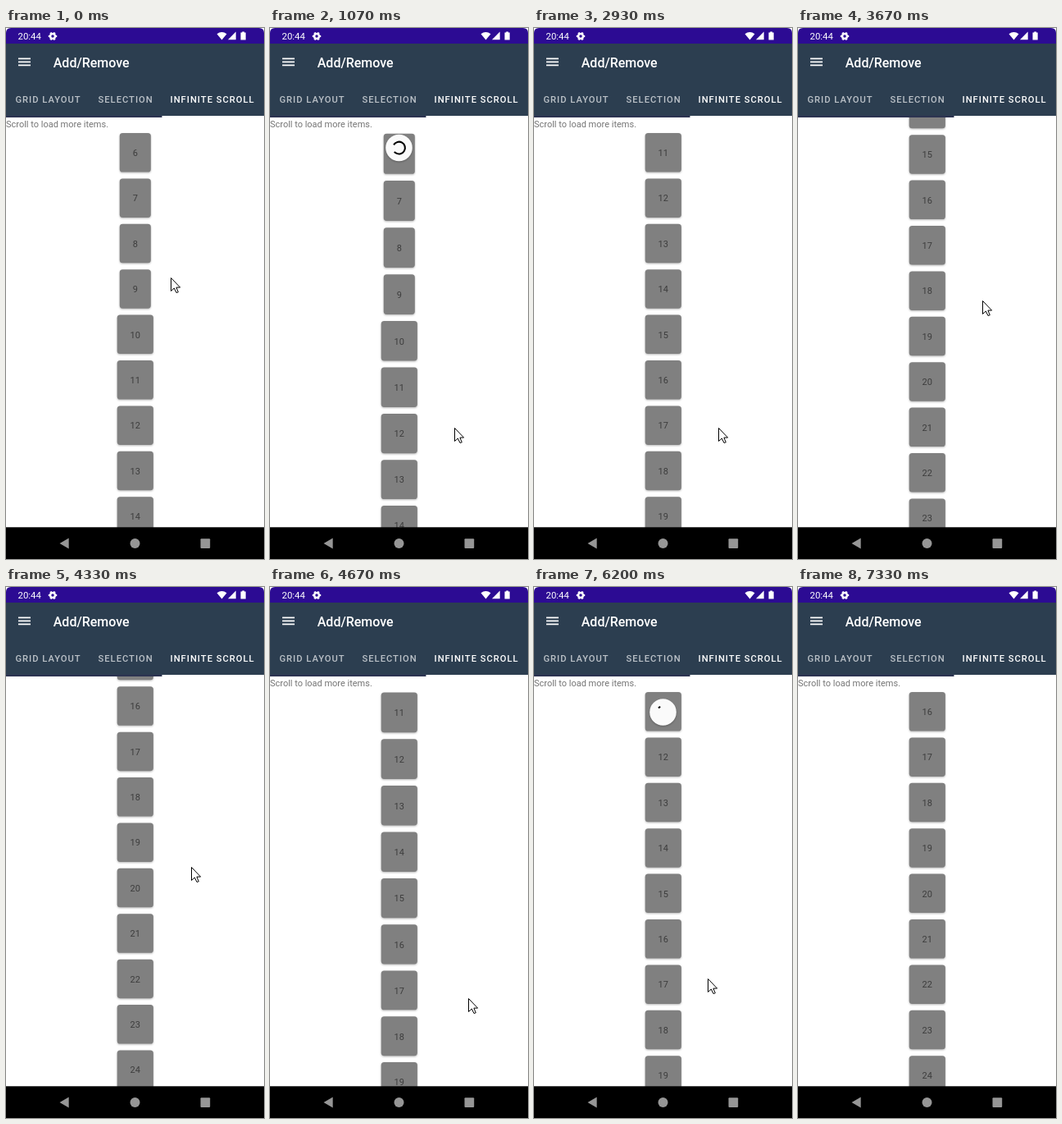
An HTML page for the animation above (8.14 s loop, 315 by 647 pixels).

```html
<!DOCTYPE html>
<html lang="en">
<head>
<meta charset="utf-8">
<title>Infinite scroll</title>
<style>
  html, body { margin: 0; width: 100%; height: 100%; overflow: hidden; background: #fff; }
  svg { display: block; width: 315px; height: 647px; }
  text { font-family: Roboto, "Noto Sans", sans-serif; font-size: 11px; }
  .bar text { fill: #fff; font-weight: 500; }
  .tabs text { font-size: 11.2px; letter-spacing: 1px; }
  .tabs .off { fill: #bcc2c8; }
  .raised { filter: drop-shadow(0 1px .8px rgba(0, 0, 0, .28)); }
  .num { fill: #3c3c3c; text-anchor: middle; }
</style>
</head>
<body>
<svg viewBox="0 0 315 647">
  <defs>
    <clipPath id="view"><rect y="109" width="315" height="500"/></clipPath>
  </defs>

  <g clip-path="url(#view)">
    <text id="caption" y="12" fill="#757575">Scroll to load more items.</text>
    <g id="list"></g>
    <g id="spinner">
      <circle class="raised" r="16.3" fill="#fafafa"/>
      <circle id="arc" r="7.4" fill="none" stroke="#000" stroke-width="2.1" pathLength="360"/>
    </g>
  </g>

  <g class="bar">
    <path d="M0 20V6Q0 0 6 0H309Q315 0 315 6V20Z" fill="#2c0b93"/>
    <rect y="19" width="315" height="90" fill="#2c3e50"/>
    <rect y="106.7" width="190.5" height="2.3" fill="#2c3451"/>
    <rect x="190.5" y="107" width="124.5" height="2" fill="#fff"/>
    <text x="14.5" y="14" style="font-size:11.4px;font-weight:400">20:44</text>
    <g transform="translate(57 10)" fill="none" stroke="#fff">
      <circle r="3" stroke-width="2.5"/>
      <circle r="4.6" stroke-width="1.3" pathLength="12" stroke-dasharray="1 1" stroke-dashoffset=".5"/>
    </g>
    <g fill="#fff">
      <path d="M257.5 7.3Q263.5 2.7 269.5 7.3L263.5 14.5Z"/>
      <path d="M280.7 4.6V14.3H271Z"/>
      <path d="M286.5 5.6H288.2V4.5H291V5.6H292.7V14.5H286.5Z"/>
    </g>
    <path d="M15 37.4H30M15 41.4H30M15 45.4H30" stroke="#fff" stroke-width="1.6"/>
    <text x="57.7" y="48.2" style="font-size:16px">Add/Remove</text>
    <g class="tabs">
      <text class="off" x="11.5" y="91">GRID LAYOUT</text>
      <text class="off" x="112.5" y="91">SELECTION</text>
      <text x="200.5" y="91">INFINITE SCROLL</text>
    </g>
  </g>

  <rect y="608.3" width="315" height="38.7" fill="#000"/>
  <g fill="#969696">
    <path d="M65.5 628L76.7 621.5V634.5Z"/>
    <circle cx="157.5" cy="628" r="6"/>
    <rect x="237.5" y="622.3" width="11.7" height="11.7" rx="1"/>
  </g>

  <path id="cursor" d="M.5 .5V16.5L4.3 13L7 18.5L9.3 17.8L6.9 12.1H11.6Z" fill="#fff" stroke="#000" stroke-linejoin="round"/>
</svg>

<script>
const LOOP = 8140, TOP = 109, VIEW = 500;
const FIRST = 128, PITCH = 55.4, CARD = 47.5, SLOTS = 18, MID = 157.8;
const REST = 152.5, TRAVEL = 61, SETTLE = 200, SHRINK = 150;
const FIRST_ITEM = 6, BATCH = 5, DROP_GAP = 80;

const $ = id => document.getElementById(id);
const smooth = u => u * u * (3 - 2 * u);
const part = (t, start, length) => Math.min(1, Math.max(0, (t - start) / length));
const ease = (t, start, length) => smooth(part(t, start, length));
const mix = (a, b, u) => a + (b - a) * u;

// Where the mouse goes next, and when.
const MOVES = [
  { at: 20, ms: 250, x: 182, y: 151 },
  { at: 400, ms: 660, x: 225, y: 487 },
  { at: 2900, ms: 230, x: 222, y: 490 },
  { at: 3220, ms: 260, x: 225, y: 332 },
  { at: 4290, ms: 300, x: 242, y: 501 },
  { at: 4720, ms: 340, x: 211, y: 180 },
  { at: 5220, ms: 310, x: 211, y: 472 },
  { at: 6100, ms: 820, x: 239, y: 592 }
];
const POINTER_END = 7330;

// Overscrolls at the top; those with a done time also refresh the list.
const PULLS = [
  { at: 400, ms: 660, peak: 11, done: 2130 },
  { at: 4560, ms: 100, peak: 8 },
  { at: 5220, ms: 310, peak: 13.5, done: 6600 }
].map(p => ({ ...p, release: p.at + p.ms + 30 }));
const REFRESHES = PULLS.filter(p => p.done);

const rise = (p, t) => p.peak * ease(t, p.at, p.ms);
const stretchAt = t => PULLS.reduce((k, p) => k + rise(p, t) * (1 - ease(t, p.release, SETTLE)), 0);

// A fling upwards, then a drag back to the top.
const scrollAt = t =>
  299 * Math.sin(part(t, 3220, 860) * Math.PI / 2) * (1 - ease(t, 4290, 300));

// After each refresh the list loses its first items one by one.
const droppedAt = t => REFRESHES.reduce((n, p) =>
  n + Math.min(BATCH, Math.max(0, Math.floor((t - p.done) / DROP_GAP) + 1)), 0);

function make(tag, parent, attrs) {
  const el = document.createElementNS("http://www.w3.org/2000/svg", tag);
  set(el, attrs);
  return parent.appendChild(el);
}
function set(el, attrs) {
  for (const k in attrs) el.setAttribute(k, attrs[k]);
}
const cards = Array.from({ length: SLOTS }, () => {
  const g = make("g", $("list"), {});
  const box = make("rect", g, { class: "raised", height: CARD, rx: 3.6, fill: "#808080" });
  const num = make("text", g, { class: "num", x: MID, y: 28 });
  return { g, box, num };
});

// Stretch is anchored at the top of the view and fades towards the bottom.
const bend = (y, k) => y + k * (1 - (1 - part(y, TOP, VIEW)) ** 1.7);

function place(el, y, h, k) {
  const a = bend(y, k), b = bend(y + h, k);
  set(el, { transform: `translate(0 ${a}) scale(1 ${(b - a) / h})` });
}

function drawList(t) {
  const scroll = scrollAt(t), k = stretchAt(t), first = FIRST_ITEM + droppedAt(t);
  place($("caption"), TOP - scroll, 17, k);
  cards.forEach(({ g, box, num }, i) => {
    const label = String(first + i), width = 32 + 6.1 * label.length;
    set(box, { x: MID - width / 2, width });
    num.textContent = label;
    place(g, FIRST + i * PITCH - scroll, CARD, k);
  });
}

function drawSpinner(t) {
  const p = REFRESHES.find(p => t >= p.at && t < p.done + SHRINK);
  $("spinner").style.display = p ? "" : "none";
  if (!p) return;
  const lag = TRAVEL * (1 - rise(p, t) / 15) ** 1.7;
  const y = REST - lag * (1 - ease(t, p.release, SETTLE));
  const size = 1 - part(t, p.done, SHRINK);

  // The arc grows with the pull, then its tail and head chase each other.
  const pull = part(t, p.at, p.ms), half = 666;
  const tail = 270 * ease(t, p.release, half);
  const head = 270 * ease(t, p.release + half, half);
  const spin = Math.max(0, t - p.release) * 0.162;
  const angle = mix(-270, -150, pull) + tail + spin;

  set($("spinner"), { transform: `translate(157.5 ${y}) scale(${size})` });
  set($("arc"), {
    transform: `rotate(${angle})`,
    "stroke-dasharray": `${290 * pull - tail + head} 360`,
    opacity: mix(0.3, 1, part(pull, 0, 0.7))
  });
}

function drawPointer(t) {
  let x = 201, y = 304;
  for (const m of MOVES) {
    const u = ease(t, m.at, m.ms);
    x = mix(x, m.x, u);
    y = mix(y, m.y, u);
  }
  $("cursor").style.display = t < POINTER_END ? "" : "none";
  set($("cursor"), { transform: `translate(${Math.round(x)} ${Math.round(y)})` });
}

const begin = performance.now();
function tick() {
  const t = (performance.now() - begin) % LOOP;
  drawList(t);
  drawSpinner(t);
  drawPointer(t);
  requestAnimationFrame(tick);
}
tick();
</script>
</body>
</html>
```
